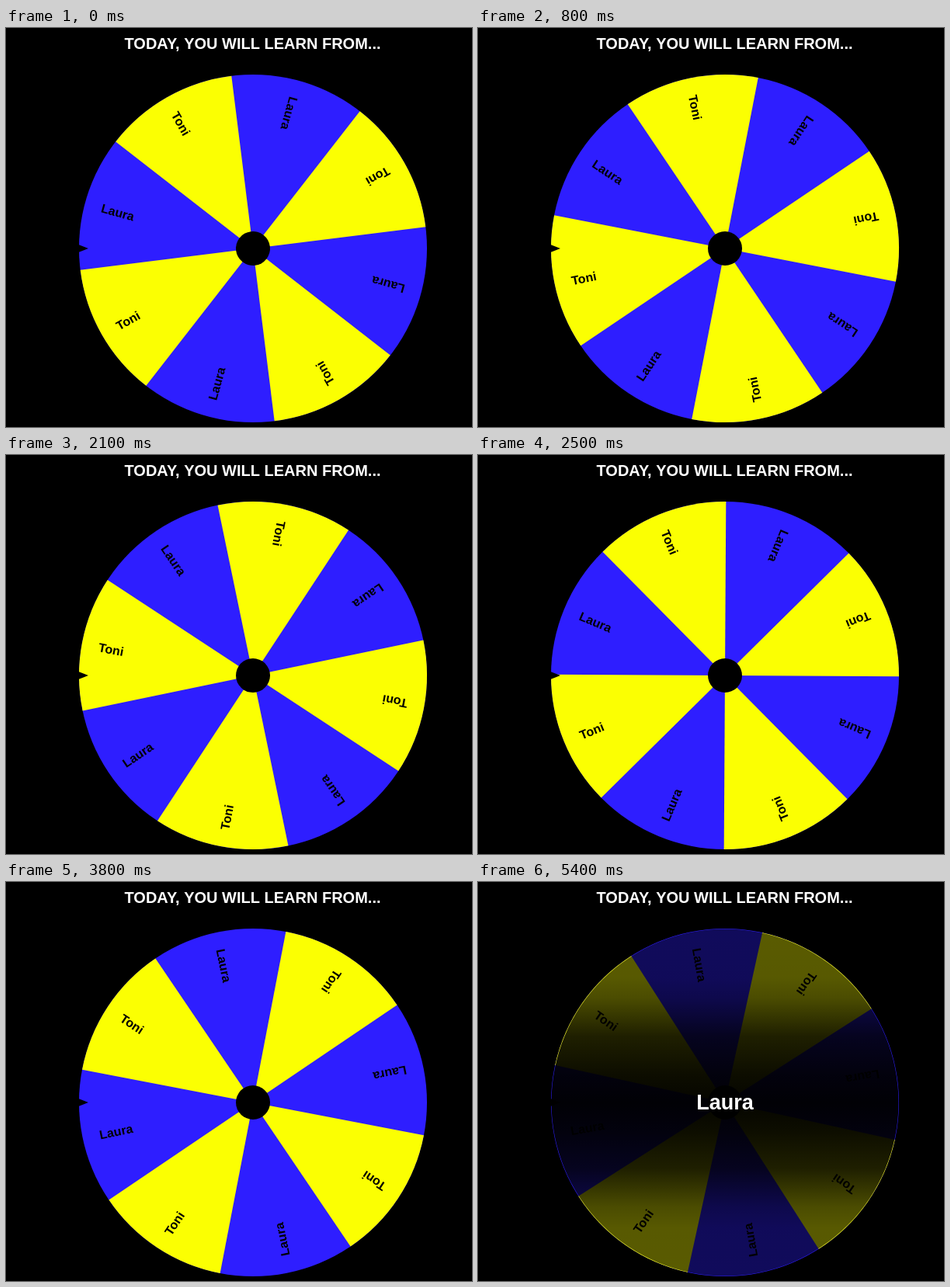
An HTML page with a canvas for the animation above (5.5 s loop, 600 by 514 pixels).

```html
<!DOCTYPE html>
<html>
<head>
<meta charset="utf-8">
<style>
  html, body { margin: 0; width: 100%; height: 100%; overflow: hidden; background: #000; }
  canvas { display: block; }
</style>
</head>
<body>
<canvas id="stage" width="600" height="514"></canvas>
<script>
const ctx = document.getElementById('stage').getContext('2d');
const LOOP = 5500, STEP = 100;
const CX = 318, CY = 284, RADIUS = 224, HUB = 22;
const BLUE = '#2e1eff', YELLOW = '#fbff02';
const NAMES = ['Laura', 'Toni'];
const RAD = Math.PI / 180;
const END_ANGLE = 57.4;

// Degrees left to turn at given milliseconds; the fourth root falls almost linearly.
const SPIN = [[0, 1144.5], [800, 586.4], [1400, 309.8], [2100, 114.1], [3000, 19.4], [3800, 1.5], [4690, 0]];
const FADE_START = 4450, FADE_TIME = 400;

const shade = ctx.createLinearGradient(0, CY - RADIUS, 0, CY + RADIUS);
for (const [pos, alpha] of [[0, .645], [.14, .65], [.2, .7], [.31, .88], [.42, .95], [.5, .98]]) {
  shade.addColorStop(pos, `rgba(0,0,0,${alpha})`);
  shade.addColorStop(1 - pos, `rgba(0,0,0,${alpha})`);
}

function remaining(t) {
  const i = SPIN.findIndex(([time]) => time > t);
  if (i < 0) return 0;
  const [t0, r0] = SPIN[i - 1], [t1, r1] = SPIN[i];
  const a = r0 ** .25, b = r1 ** .25;
  return (a + (b - a) * (t - t0) / (t1 - t0)) ** 4;
}

function disc(x, y, r, fill) {
  ctx.fillStyle = fill;
  ctx.beginPath();
  ctx.arc(x, y, r, 0, 2 * Math.PI);
  ctx.fill();
}

function text(str, x, y, size, fill, align) {
  ctx.font = `bold ${size}px "Liberation Sans", Arial, sans-serif`;
  ctx.textAlign = align;
  ctx.fillStyle = fill;
  ctx.fillText(str, x, y);
}

function drawWheel(angle) {
  ctx.save();
  ctx.translate(CX, CY);
  disc(0, 0, RADIUS, BLUE);
  // Each wedge is drawn pointing left, where its label reads upright.
  ctx.rotate((angle + 22.5 + 90) * RAD);
  for (let i = 0; i < 8; i++) {
    if (i % 2) {
      ctx.fillStyle = YELLOW;
      ctx.beginPath();
      ctx.moveTo(0, 0);
      ctx.arc(0, 0, RADIUS, 157.5 * RAD, 202.5 * RAD);
      ctx.fill();
    }
    text(NAMES[i % 2], -202, 7, 16, '#000', 'left');
    ctx.rotate(45 * RAD);
  }
  disc(0, 0, HUB, '#000');
  ctx.restore();
}

function drawPointer() {
  ctx.fillStyle = '#000';
  ctx.beginPath();
  ctx.moveTo(92, CY - 5.5);
  ctx.lineTo(106, CY);
  ctx.lineTo(92, CY + 5.5);
  ctx.fill();
}

function draw(t) {
  ctx.fillStyle = '#000';
  ctx.fillRect(0, 0, 600, 514);
  text('TODAY, YOU WILL LEARN FROM...', 317.5, 27, 20, '#fff', 'center');
  drawWheel(END_ANGLE - remaining(t));
  drawPointer();

  ctx.globalAlpha = Math.min(1, Math.max(0, (t - FADE_START) / FADE_TIME));
  disc(CX, CY, RADIUS - .5, shade);
  text(NAMES[0], CX, 293, 27, '#fff', 'center');
  ctx.globalAlpha = 1;
}

const start = performance.now();
function tick() {
  const t = (performance.now() - start) % LOOP;
  draw(Math.floor(t / STEP) * STEP);
  requestAnimationFrame(tick);
}
tick();
</script>
</body>
</html>
```
